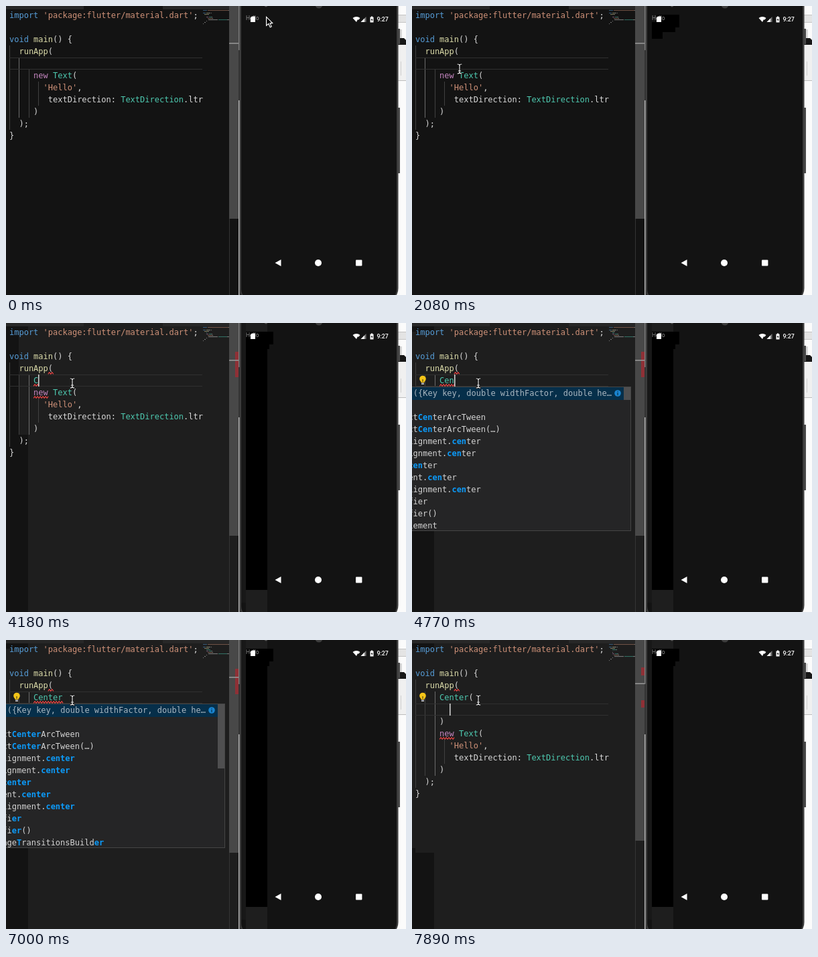
Write an HTML page with a canvas that moves like this. It is 597x432 px and loops after 8 s.

```html
<!DOCTYPE html>
<html lang="en">
<head>
<meta charset="utf-8">
<title>Editor and phone</title>
<style>
html, body { margin: 0; width: 100%; height: 100%; overflow: hidden; background: #131313; }
canvas { display: block; }
</style>
</head>
<body>
<canvas id="stage" width="597" height="432"></canvas>
<script>
const ctx = document.getElementById('stage').getContext('2d');
const LOOP = 8000, CH = 7.224, LEFT = 5, ROW = 18, TOP = 14;
const MONO = '12px "DejaVu Sans Mono", monospace';
const DARK = '#131313', LIGHT = '#1e1e1e';
const INK = { b: '#569cd6', s: '#ce9178', f: '#dcdcaa', k: '#c586c0', t: '#4ec9b0', w: '#d8d8d8' };

const head = [
  [0, 'b', 'import', 'w', ' ', 's', "'package:flutter/material.dart'", 'w', ';'],
  [0],
  [0, 'b', 'void', 'w', ' ', 'f', 'main', 'w', '() {'],
  [2, 'f', 'runApp', 'w', '(']
];
const tail = [
  [5, 'k', 'new', 'w', ' ', 't', 'Text', 'w', '('],
  [7, 's', "'Hello'", 'w', ','],
  [8, 'w', 'textDirection: ', 't', 'TextDirection', 'w', '.ltr'],
  [5, 'w', ')'],
  [2, 'w', ');'],
  [0, 'w', '}']
];

// Word typed so far, by time
const typing = [[4180, 'C'], [4630, 'Ce'], [4770, 'Cen'], [6260, 'Cent'], [6400, 'Cente'], [6550, 'Center'], [7150, 'Center()'], [7890, 'Center(']];
// Caret column, -1 when hidden
const caret = [[0, -1], [2380, 4], [2980, 5], [3430, -1], [3880, 5], [4180, 6], [4630, 7], [4770, 8], [5220, -1],
  [5820, 8], [6260, 9], [6400, 10], [6550, 11], [7000, -1], [7150, 12], [7590, -1], [7890, 7]];
const arrowPath = [[388, 15], [388, 13], [386, 10], [381, 10], [375, 12], [367, 17], [359, 23], [352, 27], [347, 29]];
const beamPath = [[1490, 322, 28], [1640, 240, 58], [1790, 150, 84], [1930, 92, 95], [2080, 71, 94],
  [2380, 66, 86], [2830, 88, 89], [2980, 99, 90]];

const latest = (list, t) => list.filter(e => e[0] <= t).pop();
const colX = c => LEFT + c * CH;
const rowY = r => TOP + r * ROW;

function rect(color, x, y, x2, y2) {
  ctx.fillStyle = color;
  ctx.fillRect(x, y, x2 - x, y2 - y);
}

function disc(color, x, y, r) {
  ctx.fillStyle = color;
  ctx.beginPath();
  ctx.arc(x, y, r, 0, 7);
  ctx.fill();
}

function poly(color, ...pts) {
  ctx.fillStyle = color;
  ctx.beginPath();
  pts.forEach(([x, y]) => ctx.lineTo(x, y));
  ctx.closePath();
  ctx.fill();
}

function text(str, x, y, color, font = MONO) {
  ctx.font = font;
  ctx.fillStyle = color;
  ctx.fillText(str, x, y);
}

function clipped(x, y, x2, y2, draw) {
  ctx.save();
  ctx.beginPath();
  ctx.rect(x, y, x2 - x, y2 - y);
  ctx.clip();
  draw();
  ctx.restore();
}

function squiggle(col, len, row) {
  const x = colX(col), y = rowY(row) + 7, end = x + len * CH;
  ctx.strokeStyle = '#f04545';
  ctx.lineWidth = 1.1;
  ctx.beginPath();
  for (let i = 0; x + i * 2 <= end + 1; i++) ctx.lineTo(x + i * 2, y + (i % 2 ? -1.3 : 1.3));
  ctx.stroke();
}

function eachToken(lines, fn) {
  lines.forEach((line, r) => {
    let col = line[0];
    for (let i = 1; i < line.length; i += 2) {
      fn(line[i + 1], col, r, INK[line[i]]);
      col += line[i + 1].length;
    }
  });
}

function sourceLines(t, word) {
  const name = word.replace(/[()]/g, ''), rest = word.slice(name.length);
  const lines = [...head, word ? [5, 't', name, 'w', rest] : [0]];
  if (t >= 7890) lines.push([0], [5, 'w', ')']);
  return lines.concat(tail);
}

function backdrop(t) {
  rect(DARK, 0, 0, 348, 432);
  if (t >= 2380) rect(LIGHT, 33, 0, 348, 432);
  if (t >= 4180) rect(LIGHT, 19, 13, 33, 167);
  if (t >= 4630) rect(LIGHT, 0, 13, 327, 311);
  if (t >= 7890) rect(LIGHT, 5, 13, 347, 318);
  rect('#272727', 0, 0, 116, 5);
  rect('#272727', 234, 0, 333, 5);
}

function guides(t, grown) {
  const typed = t >= 4180;
  const dim = '#404040', lit = '#6c6c6c';
  rect(dim, 5, 59, 6, 185 + grown);
  rect(typed ? dim : lit, 19, 77, 20, 167 + grown);
  rect(typed ? lit : dim, 34, typed ? 77 : 95, 35, 167 + grown);
  rect(dim, 48, 113 + grown, 49, 149 + grown);
  const y = t >= 7890 ? 95 : 77;
  rect('#303030', 5, y, 293, y + 1);
  rect('#303030', 5, y + 17, 293, y + 18);
}

function bulb() {
  disc('#f5c518', 16, 83.5, 4.8);
  rect('#f5c518', 13.5, 86, 18.5, 89);
  rect('#3a3214', 15.5, 84, 16.5, 88);
  rect('#b0b0b0', 14, 89.5, 18, 92);
}

function scrollbar(t, lines) {
  clipped(293, 5, 333, 60, () => {
    ctx.globalAlpha = .6;
    eachToken(lines, (s, col, r, color) => {
      for (let i = 0; i < s.length; i++)
        if (s[i] !== ' ') rect(color, 294 + col + i, 6 + r * 2, 294.8 + col + i, 7.1 + r * 2);
    });
    ctx.globalAlpha = 1;
  });
  rect('#343434', 333, 0, 334, 432);
  rect('#484848', 333, 0, 347, t >= 7890 ? 300 : 318);
  const red = '#8f3036';
  if (t >= 7890) {
    rect(red, 342, 41, 347, 53);
    rect(red, 342, 90, 347, 101);
  } else if (t >= 7150) {
    rect(red, 342, 43, 347, 55);
    rect(red, 342, 69, 347, 81);
  } else if (t >= 4180) rect(red, 342, 43, 347, 81);
  const y = t >= 7890 ? 64.5 : 55;
  rect('#999', 333, y, 347, y + 1.5);
}

// Splits a row on [brackets] and sets the marked parts in bold blue
function popupRow(str, y) {
  let x = -5.6;
  str.split(/[\[\]]/).forEach((part, i) => {
    text(part, x, y + 4, i % 2 ? '#0c9bfa' : '#d4d4d4', i % 2 ? 'bold ' + MONO : MONO);
    x += part.length * CH;
  });
}

function popup(n) {
  rect('#454545', 0, 95, 327, 311);
  rect('#252526', 0, 96, 326, 310);
  rect('#062f4a', 0, 96, 316, 115);
  text('({Key key, double widthFactor, double he…', 1.8, 109, '#a9b6c0');
  disc('#1a84d0', 307, 105, 4.8);
  rect('#062f4a', 306.4, 104, 307.6, 108);
  rect('#062f4a', 306.4, 102, 307.6, 103);
  rect('#4f4f50', 316, 96, 326, n < 4 ? 115 : n < 5 ? 145 : 192);
  const mark = w => '[' + w.slice(0, n) + ']' + w.slice(n);
  const low = mark('center'), up = mark('Center'), full = n > 5;
  [
    'ct' + up + 'ArcTween', 'ct' + up + 'ArcTween(…)', 'lignment.' + low, 'ignment.' + low,
    low, 'ent.' + low, 'lignment.' + low,
    full ? 'fi[er]' : 'fier', full ? 'fi[er]()' : 'fier()',
    full ? 'age[T]ransitionsBuild[er]' : 'lement'
  ].forEach((row, i) => popupRow(row, 141 + i * ROW));
}

function editor(t) {
  const word = (latest(typing, t) || [0, ''])[1];
  const lines = sourceLines(t, word);
  const grown = t >= 7890 ? 36 : 0;
  const open = t >= 4630 && t < 7150;
  backdrop(t);
  guides(t, grown);
  clipped(0, 5, 294, 432, () => eachToken(lines, (s, col, r, color) => text(s, colX(col), rowY(r) + 4, color)));
  if (word) {
    squiggle(8, 1, 3);
    if (t < 7150) squiggle(5, word.length, 4);
    squiggle(5, 3, grown ? 7 : 5);
  }
  scrollbar(t, lines);
  if (t >= 4630) bulb();
  if (open) popup(word.length);
  const col = latest(caret, t)[1];
  if (col >= 0) {
    const x = Math.round(colX(col)) - (col > 5 ? 0 : 1), y = grown ? 95 : 77;
    rect('#d0d0d0', x, y, x + 1.6, y + 18);
  }
}

function browser() {
  rect('#fbfbfb', 583, 0, 597, 432);
  rect('#e4e4e4', 585, 13, 597, 25);
  rect('#c4c4c4', 585, 13, 597, 14);
  rect('#c4c4c4', 585, 24, 597, 25);
  rect('#d8d8d8', 585, 35, 591, 48);
  poly('#161616', [585, 48], [594, 48], [597, 51], [597, 58], [585, 58]);
  rect('#f0f0f0', 585, 58, 597, 111);
  rect('#d0d0d0', 589, 83, 590, 104);
  rect('#bdbdbd', 585, 111, 597, 112);
}

function statusBar() {
  text('Hello', 358, 20.5, '#8d8d8d', '8.5px Roboto, sans-serif');
  poly('#fff', [367, 15.5], [372, 15.5], [372, 24], [365, 24], [365, 18]);
  poly('#fff', [517.5, 18], [520, 16.6], [523, 16], [526, 16.6], [528.5, 18], [526, 21], [525, 20], [523, 24]);
  poly('#777', [529.5, 24], [537.5, 24], [537.5, 16]);
  poly('#fff', [529.5, 24], [535, 24], [535, 18.5]);
  rect('#fff', 543.5, 16.5, 548.5, 24.5);
  rect('#fff', 545, 15.5, 547, 17);
  poly('#131313', [546.5, 18], [544.5, 21], [546, 21], [545.5, 23.5], [547.6, 20], [546.2, 20]);
  text('9:27', 553.5, 23, '#fff', '500 8.8px Roboto, sans-serif');
}

function phone(t) {
  rect('#343434', 347, 0, 350, 432);
  rect('#7d7d7d', 347, 0, 348.5, 66);
  rect('#b4b4b4', 347, 141, 348.5, 432);
  rect('#4a4a4a', 585, 152, 588, 250);
  rect('#4a4a4a', 585, 34, 588, 57);
  ctx.fillStyle = '#3c3c3c';
  ctx.beginPath();
  ctx.roundRect(349, -20, 236.5, 462, 20);
  ctx.fill();
  ctx.fillStyle = DARK;
  ctx.beginPath();
  ctx.roundRect(351, -20, 232, 461, 18);
  ctx.fill();
  if (t >= 2380) {
    rect('#181818', 351, 0, 358, 418);
    rect(LIGHT, 358, 0, 390, 432);
    rect('#000', 358, 13, 390, 399);
  }
  if (t >= 150) {
    const x = t < 1490 ? arrowAt(t)[0] : 347;
    clipped(x, 10, 400, 50, () => {
      rect('#000', 365, 13, 399, 32);
      rect('#000', 358, 24, 393, 39);
      rect('#000', 358, 39, 374, 49);
    });
  }
  disc('#555', 388, -1, 2.4);
  disc('#3e3e3e', 467, -2, 5.5);
  statusBar();
  poly('#fff', [401.5, 384], [410.5, 379], [410.5, 389]);
  disc('#fff', 466, 384, 5);
  ctx.fillStyle = '#fff';
  ctx.beginPath();
  ctx.roundRect(522, 379.5, 9.4, 9, 1);
  ctx.fill();
}

function arrowAt(t) {
  return arrowPath[t < 150 ? 0 : Math.min(8, 1 + Math.floor((t - 150) / 148.5))];
}

function arrow(x, y) {
  poly('#fff', [x, y], [x, y + 15.5], [x + 3.6, y + 12.4], [x + 6, y + 17.5], [x + 9, y + 16], [x + 6.8, y + 11.4], [x + 11, y + 11]);
  poly('#000', [x + 1.2, y + 2.8], [x + 1.2, y + 13], [x + 4, y + 10.6], [x + 6.5, y + 16], [x + 7.6, y + 15.4], [x + 5.2, y + 10.2], [x + 8.4, y + 10]);
}

function beam(x, y) {
  ctx.lineCap = 'round';
  for (const [color, width] of [['#000', 2.6], ['#f4f4f4', 1.2]]) {
    ctx.strokeStyle = color;
    ctx.lineWidth = width;
    ctx.beginPath();
    for (const s of [-1, 1]) {
      ctx.moveTo(x - 3, y + s * 7);
      ctx.quadraticCurveTo(x, y + s * 7, x, y + s * 5);
      ctx.quadraticCurveTo(x, y + s * 7, x + 3, y + s * 7);
    }
    ctx.moveTo(x, y - 6);
    ctx.lineTo(x, y + 6);
    ctx.moveTo(x - 1.8, y + 3);
    ctx.lineTo(x + 1.8, y + 3);
    ctx.stroke();
  }
  ctx.lineCap = 'butt';
}

function draw(t) {
  browser();
  editor(t);
  phone(t);
  if (t < 1490) arrow(...arrowAt(t));
  else beam(...latest(beamPath, t).slice(1));
}

const start = performance.now();
function tick() {
  draw((performance.now() - start) % LOOP);
  requestAnimationFrame(tick);
}
tick();
</script>
</body>
</html>
```
